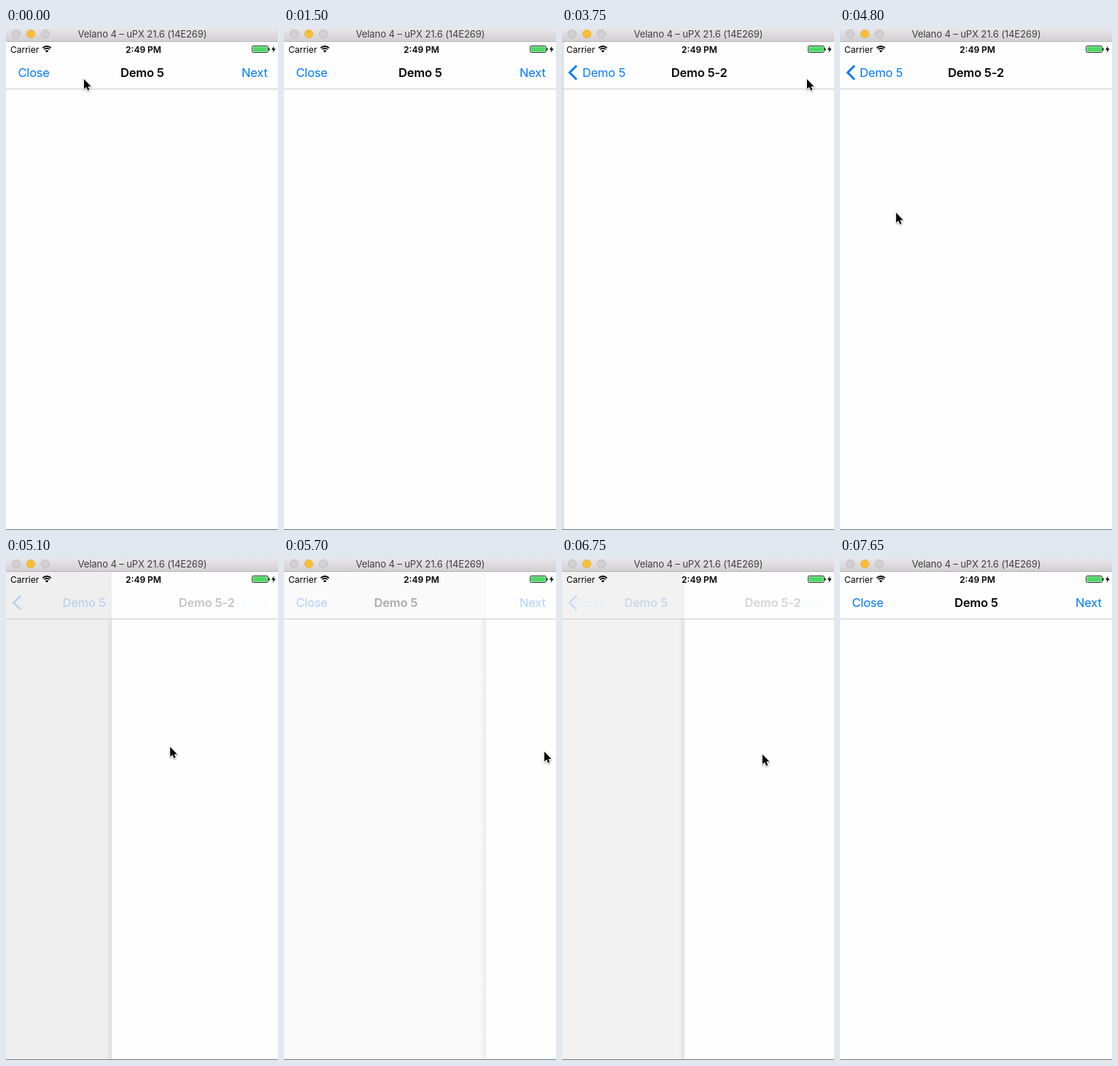
An HTML page with a canvas that plays this animation: 373 px wide and 687 px high, repeating every 8 s.

```html
<!DOCTYPE html>
<html lang="en">
<head>
<meta charset="utf-8">
<title>Swipe back demo</title>
<style>
  html, body { margin: 0; width: 100%; height: 100%; overflow: hidden; background: #fefefe; }
  canvas { display: block; }
</style>
</head>
<body>
<canvas id="stage" width="373" height="687"></canvas>
<script>
const ctx = document.getElementById('stage').getContext('2d');
const W = 373, H = 687, LOOP = 8000, STEP = 150;
const BLUE = '#007aff', BLACK = '#000';

// Where the hand pauses or turns: [time, x, y]
const stops = [
  [0, 107, 70], [300, 267, 575], [600, 267, 575], [750, 268, 385],
  [1200, 330, 700], [1950, 390, 700], [2700, 342, 15], [3000, 338, 57],
  [3750, 336, 70], [4500, 5, 250], [5550, 368, 264], [5850, 346, 266],
  [6150, 346, 266], [6450, 215, 268], [7200, 385, 270], [LOOP, 385, 270]
];

const smooth = u => {
  u = Math.min(1, Math.max(0, u));
  return u * u * (3 - 2 * u);
};
const mix = (a, b, u) => a + (b - a) * u;

function pointerAt(t) {
  const i = stops.findIndex(s => s[0] > t);
  const [t0, x0, y0] = stops[i - 1], [t1, x1, y1] = stops[i];
  const u = smooth((t - t0) / (t1 - t0));
  return [mix(x0, x1, u), mix(y0, y1, u)];
}

// Left edge of the upper page: pushed in by a spring, then dragged twice and released
function edgeAt(t, pointerX) {
  if (t < 3300) return W;
  if (t < 4500) {
    const s = (t - 3300) * 0.0155;
    return W * (1 + s) * Math.exp(-s);
  }
  const grab = t < 6300 ? 80 : 107;
  return mix(Math.max(0, pointerX - grab), W, smooth((t - 6900) / 450));
}

function rect(x, y, w, h, color) {
  ctx.fillStyle = color;
  ctx.fillRect(x, y, w, h);
}

function text(str, x, y, { size = 16.5, weight = 400, color = BLACK, spacing = -0.2, align = 'left', alpha = 1 } = {}) {
  ctx.font = `${weight} ${size}px Inter, sans-serif`;
  ctx.letterSpacing = spacing + 'px';
  ctx.textAlign = align;
  ctx.globalAlpha = alpha;
  ctx.fillStyle = color;
  ctx.fillText(str, x, y);
  ctx.globalAlpha = 1;
}

function shape(points, x, y) {
  ctx.beginPath();
  points.forEach(([dx, dy]) => ctx.lineTo(x + dx, y + dy));
  ctx.closePath();
}

function drawWindowBar() {
  const g = ctx.createLinearGradient(0, 0, 0, 18);
  g.addColorStop(0, '#e9e7e9');
  g.addColorStop(1, '#d2d0d2');
  rect(0, 0, W, 18, g);
  rect(0, 18, W, 1, '#b6b4b6');
  ctx.lineWidth = 1;
  ['#d2d0d2', '#fdbf2f', '#d2d0d2'].forEach((fill, i) => {
    ctx.beginPath();
    ctx.arc(14 + 20 * i, 8, 5.7, 0, 7);
    ctx.fillStyle = fill;
    ctx.fill();
    ctx.strokeStyle = 'rgba(0,0,0,.11)';
    ctx.stroke();
  });
  text('Velano 4 – uPX 21.6 (14E269)', 187, 13, { size: 13, color: '#414041', spacing: -0.1, align: 'center' });
}

function drawStatusBar() {
  text('Carrier', 6, 33.5, { size: 12, spacing: 0 });
  text('2:49 PM', 188.5, 33.5, { size: 12, weight: 600, spacing: 0, align: 'center' });

  ctx.strokeStyle = ctx.fillStyle = BLACK;
  ctx.lineWidth = 1.8;
  [8, 5.2].forEach(r => {
    ctx.beginPath();
    ctx.arc(56, 33, r, -2.36, -0.78);
    ctx.stroke();
  });
  ctx.beginPath();
  ctx.moveTo(56, 33.5);
  ctx.arc(56, 33.5, 3, -2.36, -0.78);
  ctx.fill();

  ctx.lineWidth = 0.8;
  ctx.beginPath();
  ctx.roundRect(337.5, 24.5, 22, 9, 1.8);
  ctx.stroke();
  rect(338.5, 25.5, 20, 7, '#4cd964');
  rect(360.3, 27.5, 1.3, 3.2, BLACK);
  shape([[3.6, 0], [0, 5.2], [2.6, 5.2], [1.6, 9.5], [5.8, 3.8], [3, 3.8]], 364, 24.5);
  ctx.fill();
}

function drawNavBar(p) {
  const below = p ** 4, above = (1 - p) ** 3;
  const titleX = 27 + 130 * p;

  ctx.globalAlpha = above;
  ctx.strokeStyle = BLUE;
  ctx.lineWidth = 3;
  ctx.beginPath();
  ctx.moveTo(20, 51.5);
  ctx.lineTo(10.5, 61);
  ctx.lineTo(20, 70.5);
  ctx.stroke();

  text('Demo 5', titleX, 67, { color: BLUE, alpha: above });
  text('Demo 5-2', 148 + 228 * p, 67, { weight: 600, alpha: above });
  text('Demo 5', titleX, 67, { weight: 600, alpha: below });
  text('Close', 16.5, 67, { color: BLUE, alpha: below });
  text('Next', 323, 67, { color: BLUE, alpha: below });
}

function drawPages(edge, p) {
  rect(0, 19, W, H - 19, '#fefefe');
  rect(0, 19, edge, H - 19, `rgba(0,0,0,${0.12 * (1 - p) ** 1.5})`);
  const g = ctx.createLinearGradient(edge - 8, 0, edge, 0);
  g.addColorStop(0, 'rgba(0,0,0,0)');
  g.addColorStop(1, `rgba(0,0,0,${0.3 * p * (1 - p)})`);
  rect(edge - 8, 84, 8, H - 84, g);
  rect(0, 83, W, 1, '#cbcbcb');
  rect(0, 686, W, 1, '#777');
}

function drawPointer(x, y) {
  shape([[0, 0], [0, 13.6], [3.1, 10.8], [5.3, 15.6], [7.5, 14.6], [5.4, 9.9], [9.6, 9.9]], x, y);
  ctx.save();
  ctx.shadowColor = 'rgba(0,0,0,.4)';
  ctx.shadowBlur = 2;
  ctx.shadowOffsetY = 1;
  ctx.lineWidth = 1.8;
  ctx.strokeStyle = '#fff';
  ctx.stroke();
  ctx.restore();
  ctx.fillStyle = BLACK;
  ctx.fill();
}

function frame(now) {
  const t = Math.floor((now % LOOP) / STEP) * STEP;
  const [x, y] = pointerAt(t);
  const edge = edgeAt(t, x);
  drawPages(edge, edge / W);
  drawWindowBar();
  drawStatusBar();
  drawNavBar(edge / W);
  drawPointer(x, y);
  requestAnimationFrame(frame);
}
requestAnimationFrame(frame);
</script>
</body>
</html>
```
